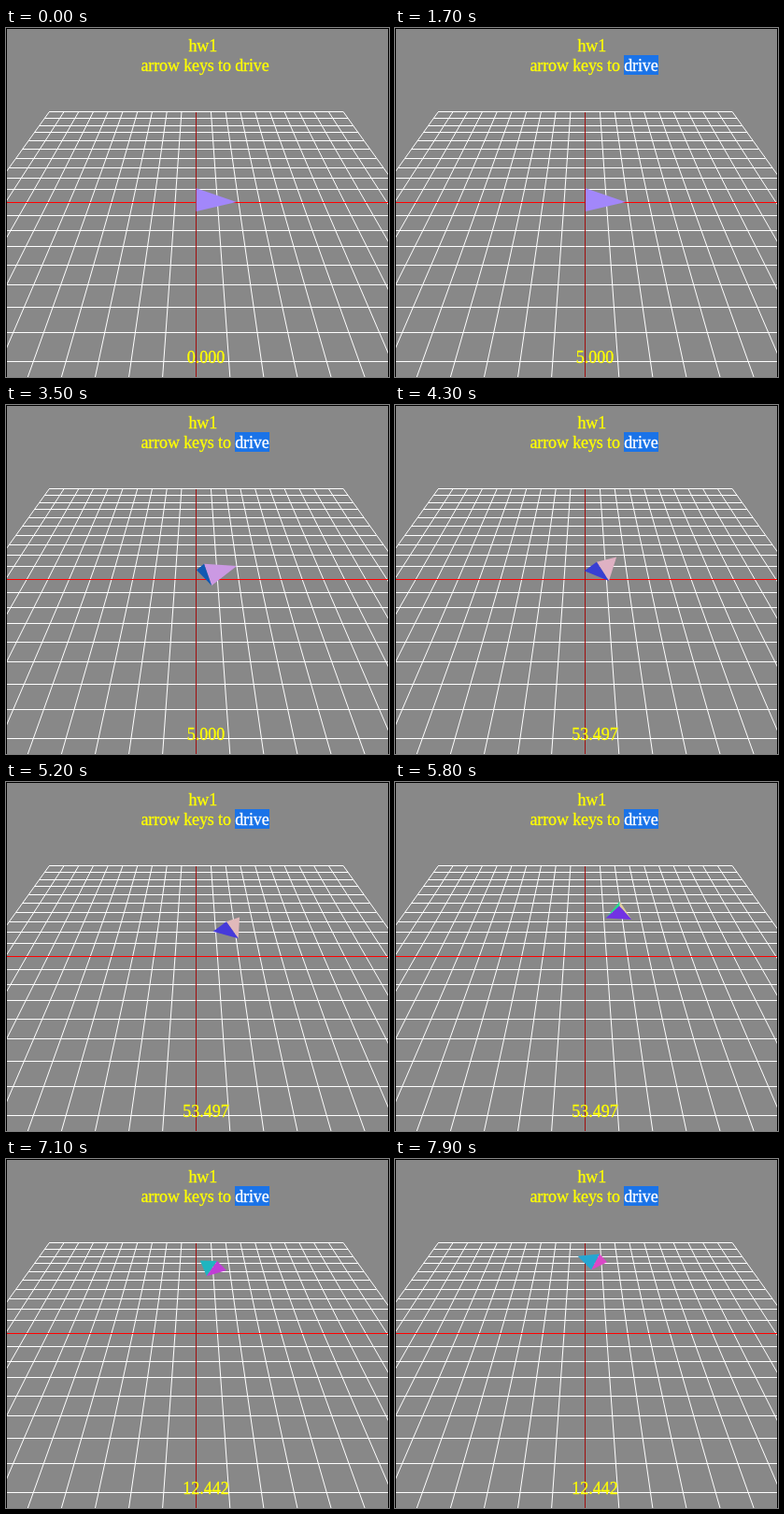
Recreate the animation shown at these times as an HTML page with a canvas. Size 410x373 px, loop 8 s.

```html
<!DOCTYPE html>
<html lang="en">
<head>
<meta charset="utf-8">
<title>hw1</title>
<style>
  html, body { margin: 0; width: 100%; height: 100%; overflow: hidden; background: #888; }
  #stage { position: absolute; left: 0; top: 0; width: 410px; height: 373px; overflow: hidden; }
  canvas { display: block; }
  .label {
    position: absolute; left: 18px; width: 392px;
    text-align: center; white-space: nowrap;
    font: 18px/21px "Liberation Serif", "Times New Roman", serif;
    color: #ff0;
    -webkit-text-stroke: 0.3px;
  }
  #title { top: 8px; left: 17px; letter-spacing: -0.12px; }
  #title span { position: relative; top: 1px; }
  #speed { top: 342px; }
  #title #word { display: inline-block; top: 0; height: 20px; padding-top: 1px; line-height: 21px; vertical-align: top; }
  #word.on { background: #1a73e8; color: #fff; }
</style>
</head>
<body>
<div id="stage">
  <canvas id="view" width="410" height="373"></canvas>
  <div class="label" id="title"><span>hw1&nbsp;</span><br><span>arrow keys to </span><span id="word">drive</span></div>
  <div class="label" id="speed">0.000</div>
</div>
<script>
const LOOP = 8000, TICK = 100;
const W = 410, H = 373;
const ctx = document.getElementById('view').getContext('2d');
const word = document.getElementById('word');
const speed = document.getElementById('speed');

// Camera looks at the origin from above
const CX = 203.7, CY = 186.08, FOCAL = 410.2, DIST = 181;
const PITCH = 37.6 * Math.PI / 180;
const SIN = Math.sin(PITCH), COS = Math.cos(PITCH);

// Vehicle: length, height, half width
const LEN = 19, TALL = 8, HALF = 7;

// Points of the drive: time, x, z, heading in degrees
const PATH = [
  [1600, 0, 0, 0],
  [2700, 1.5, 0, 0],
  [3500, 3.6, -1.2, 30],
  [4300, 5.3, -2.6, 56],
  [5200, 14.9, -17.6, 63],
  [5800, 18, -33, 84],
  [6400, 15.1, -50, 108],
  [7900, 8.6, -67.2, 135]
];

const clamp = (v, lo, hi) => Math.min(hi, Math.max(lo, v));

function toView([x, y, z]) {
  return [x, y * COS - z * SIN, y * SIN + z * COS];
}

function project(p) {
  const [x, up, near] = toView(p);
  const s = FOCAL / (DIST - near);
  return [CX + x * s, CY - up * s];
}

function pose(t) {
  const next = PATH.findIndex(k => k[0] >= t);
  const i = clamp(next, 1, PATH.length - 1);
  const a = PATH[i - 1], b = PATH[i];
  const u = clamp((t - a[0]) / (b[0] - a[0]), 0, 1);
  return [1, 2, 3].map(j => a[j] + (b[j] - a[j]) * u);
}

// Each key press changes the speed by a factor of 1.2
function speedAt(t) {
  if (t < 1700) return 0;
  const faster = clamp(Math.floor((t - 3900) / 30), 0, 13);
  const slower = clamp(Math.floor((t - 6100) / 42), 0, 8);
  return 5 * 1.2 ** (faster - slower);
}

function drawGrid() {
  ctx.fillStyle = '#888';
  ctx.fillRect(0, 0, W, H);
  ctx.strokeStyle = '#fff';
  ctx.lineWidth = 1;
  ctx.beginPath();
  for (let k = -100; k <= 100; k += 10) {
    if (k) {
      ctx.moveTo(...project([k, 0, -100]));
      ctx.lineTo(...project([k, 0, 100]));
    }
    const [left, y] = project([-100, 0, k]);
    const [right] = project([100, 0, k]);
    const row = Math.floor(y) + 0.5;
    ctx.moveTo(left, row);
    ctx.lineTo(right, row);
  }
  ctx.stroke();
  ctx.fillStyle = '#f00';
  ctx.fillRect(0, 186, W, 1);
  ctx.fillStyle = '#a00f0f';
  ctx.fillRect(203, 90, 1, H - 90);
}

function drawFace(...corners) {
  const [p, q, r] = corners.map(project);
  const turn = (q[0] - p[0]) * (r[1] - p[1]) - (q[1] - p[1]) * (r[0] - p[0]);
  if (turn >= 0) return; // facing away
  const [a, b, c] = corners.map(toView);
  const u = b.map((v, i) => v - a[i]);
  const v = c.map((w, i) => w - a[i]);
  const normal = [0, 1, 2].map(i => {
    const j = (i + 1) % 3, k = (i + 2) % 3;
    return u[j] * v[k] - u[k] * v[j];
  });
  const size = Math.hypot(...normal);
  // Surface direction seen by the camera becomes the colour
  ctx.fillStyle = `rgb(${normal.map(n => Math.round((n / size + 1) * 127.5))})`;
  ctx.beginPath();
  ctx.moveTo(...p);
  ctx.lineTo(...q);
  ctx.lineTo(...r);
  ctx.fill();
}

function drawVehicle(t) {
  const [x, z, deg] = pose(t);
  const c = Math.cos(deg * Math.PI / 180), s = Math.sin(deg * Math.PI / 180);
  const place = (ahead, y, side) => [x + ahead * c + side * s, y, z - ahead * s + side * c];
  const top = place(0, TALL, 0), tip = place(LEN, 0, 0);
  const right = place(0, 0, HALF), left = place(0, 0, -HALF);
  drawFace(top, right, tip);
  drawFace(top, tip, left);
  drawFace(top, left, right);
}

function drawBorder() {
  ctx.fillStyle = '#000';
  ctx.fillRect(0, 0, W, 1);
  ctx.fillRect(0, 0, 1, H);
  ctx.fillRect(W - 1, 0, 1, H);
}

function draw(t) {
  drawGrid();
  drawVehicle(t);
  drawBorder();
  word.className = t >= 600 ? 'on' : '';
  speed.textContent = speedAt(t).toFixed(3);
}

const start = performance.now();
function loop() {
  const t = (performance.now() - start) % LOOP;
  draw(Math.floor(t / TICK) * TICK);
  requestAnimationFrame(loop);
}
loop();
</script>
</body>
</html>
```
